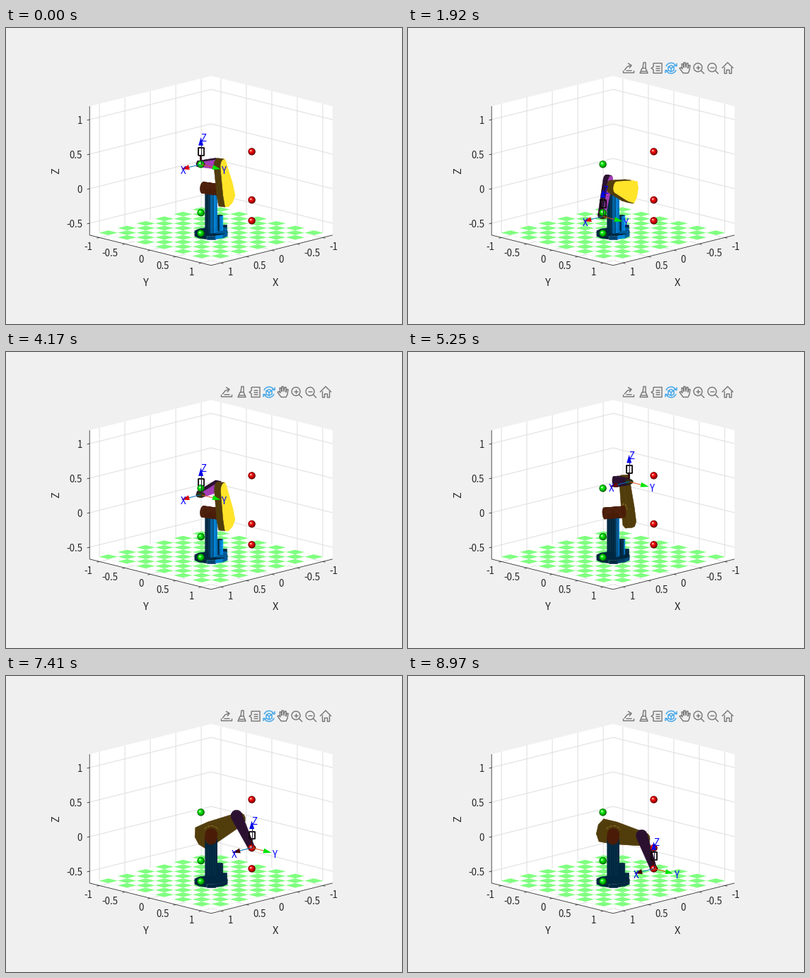
A matplotlib script that plays this animation: 560 by 420 pixels, repeating every 9 s.

```python
import numpy as np
import matplotlib.pyplot as plt
from matplotlib.animation import FuncAnimation
from matplotlib.collections import LineCollection, PolyCollection
from matplotlib.patches import Circle

plt.rcParams["font.family"] = ["Noto Sans CJK JP", "DejaVu Sans"]
PX = 0.72                      # points per pixel at 100 dpi
FRAMES, STEP = 300, 50
W, FLOOR, TOP = 1.193, -0.672, 1.194
VIEW = np.array([0.684, 0.684, 0.25])
UPPER, FORE, OFFSET = 0.4318, 0.4323, 0.15

BLUE, RUST = (0, .447, .741), (.85, .325, .098)
YELLOW, PURPLE = (.929, .694, .125), (.494, .184, .556)
INK, GRID = "#262626", "#dedede"

LEFT = [(.5, .3, z) for z in (.5, -.2, -.5)]
RIGHT = [(-.5, .3, z) for z in (.5, -.2, -.5)]
ROUTE = np.array(LEFT + LEFT[:1] + RIGHT)


def project(p):
    x, y, z = np.moveaxis(np.asarray(p, float), -1, 0)
    return np.stack([290 + 72 * (y - x), 228 + 18 * (x + y) - 98 * z], -1)


fig = plt.figure(figsize=(5.6, 4.2), dpi=100, facecolor="#f0f0f0")
ax = fig.add_axes([0, 0, 1, 1])
ax.set(xlim=(0, 560), ylim=(420, 0))
ax.axis("off")


def lines(segs, color, width, z, **kw):
    return ax.add_collection(
        LineCollection(segs, colors=color, linewidths=width * PX, zorder=z, **kw),
        autolim=False)


def polys(verts, color, z, **kw):
    return ax.add_collection(
        PolyCollection(verts, facecolors=color, zorder=z, **kw), autolim=False)


def label(x, y, s, size=13.3, color=INK, ha="center", **kw):
    return ax.text(x, y, s, fontsize=size * PX, color=color, ha=ha,
                   va="center_baseline" if kw.get("rotation") is None else "center", **kw)


# ---------- axes box, grid and floor ----------
def build_box():
    wall = [(W, -W, TOP), (-W, -W, TOP), (-W, W, TOP),
            (-W, W, FLOOR), (W, W, FLOOR), (W, -W, FLOOR)]
    polys([project(wall)], "white", 0)
    ticks = (-1, -.5, 0, .5, 1)
    grid = []
    for t in ticks:
        grid += [[(t, -W, TOP), (t, -W, FLOOR), (t, W, FLOOR)],
                 [(-W, t, TOP), (-W, t, FLOOR), (W, t, FLOOR)]]
        if t > -1:
            grid.append([(W, -W, t), (-W, -W, t), (-W, W, t)])
    lines([project(g) for g in grid], GRID, 1, 1)

    edge = [project([(W, -W, TOP), (W, -W, FLOOR), (W, W, FLOOR), (-W, W, FLOOR)])]
    for t in ticks:
        name = f"{t:g}"
        a, b = project((W, t, FLOOR)), project((t, W, FLOOR))
        edge += [[a, a + (-3.5, .9)], [b, b + (3.5, .9)]]
        label(a[0] - 9.5, a[1] + 12, name, ha="right")
        label(b[0] + 9.5, b[1] + 12, name, ha="left")
        if t > -1:
            c = project((W, -W, t))
            edge.append([c, c + (-3.5, .9)])
            label(108, c[1] + .5, name, ha="right")
    lines(edge, INK, .8, 3)
    label(381, 361, "X", 14.6)
    label(198, 361, "Y", 14.6)
    label(71, 203, "Z", 14.6, rotation=90)

    n, size = 12, 2.2 / 12
    lo = -W + size * np.arange(n + 1)

    def tile(x0, x1, y0, y1):
        return project([(x0, y0, FLOOR), (x1, y0, FLOOR), (x1, y1, FLOOR), (x0, y1, FLOOR)])

    polys([tile(lo[0], lo[-1], lo[0], lo[-1])], "white", 2)
    polys([tile(lo[i], lo[i + 1], lo[j], lo[j + 1])
           for i in range(n) for j in range(n) if (i + j) % 2], "#80ff80", 2)


def ball(p, shades):
    x, y = project(p)
    for r, d, c in zip((5.2, 4.4, 2.9, 1.2), (0, .4, .8, 1.3), shades):
        ax.add_patch(Circle((x - d, y - d), r, fc=c, ec="none", zorder=8))


# ---------- toolbar ----------
def ring(x, y, r, a=0, b=360):
    t = np.radians(np.linspace(a, b, 25))
    return np.c_[x + r * np.cos(t), y + r * np.sin(t)]


def build_toolbar():
    y = 57
    def at(cx, *pts):
        return [(cx + a, y + b) for a, b in pts]

    icons = [
        at(312, (-8, 3), (-8, 6), (7, 6), (7, 3)), at(312, (-6, 3), (-2, -2), (3, -4)),
        at(312, (-1, -7), (4, -4), (1, 0)), at(312, (-4, 3), (4, 3)),
        at(333, (-2, 0), (-5, 7), (6, 7), (3, 0), (-2, 0)),
        at(333, (-1, 0), (0, -8), (3, -8), (3, 0)), at(333, (-4, 4), (4, 4)),
        at(352, (-5, -7), (7, -7), (7, 7), (-5, 7), (-5, 2), (-8, 0), (-5, -2), (-5, -7)),
        at(352, (-2, -3), (4, -3)), at(352, (-2, 0), (4, 0)), at(352, (-2, 3), (4, 3)),
        at(392, (-3, 7), (-8, 0), (-6, -1), (-4, 1), (-5, -6), (-3, -6), (-2, -1),
           (-2, -8), (0, -8), (1, -1), (2, -7), (4, -7), (4, 0), (5, -4), (7, -4),
           (6, 3), (4, 7), (-3, 7)),
        at(452, (-8, 0), (0, -8), (8, 0)),
        at(452, (-5, -2), (-5, 7), (-2, 7), (-2, 2), (2, 2), (2, 7), (5, 7), (5, -2)),
    ]
    for cx in (411, 431):
        icons += [ring(cx - 1, y - 1, 6), at(cx, (3.5, 3.5), (8, 8)), at(cx, (-4, -1), (2, -1))]
    icons.append(at(410, (0, -4), (0, 2)))
    cube = [ring(372, y, 7.5, 20, 160), ring(372, y, 7.5, 200, 340),
            at(372, (-4, -2), (0, -4), (4, -2), (4, 3), (0, 5), (-4, 3), (-4, -2), (0, 0),
               (4, -2)),
            at(372, (0, 0), (0, 5)),
            at(372, (4, -4), (8, -3), (8, -7)), at(372, (-4, 4), (-8, 3), (-8, 7))]
    return [lines(icons, "#747474", 1.4, 4), lines(cube, "#46a8ea", 1.5, 4)]


# ---------- robot solids: coordinates are (reach, side, height) ----------
def arc(cx, cy, r, a, b, n):
    t = np.radians(np.linspace(a, b, n))
    return [(cx + r * np.cos(q), cy + r * np.sin(q)) for q in t]


def side_prism(outline, s0, s1):
    """Extrude an outline of the arm plane along the side axis."""
    o = np.array(outline)
    return [np.c_[o[:, 0], np.full(len(o), s), o[:, 1]] for s in (s0, s1)]


def up_prism(cx, cy, r, z0, z1, n):
    o = np.array(arc(cx, cy, r, 0, 360, n + 1)[:-1])
    return [np.c_[o, np.full(n, z)] for z in (z0, z1)]


def turn(outline, ang, cx=0, cy=0):
    c, s = np.cos(ang), np.sin(ang)
    return [(cx + a * c - b * s, cy + a * s + b * c) for a, b in outline]


UPPER_SHAPE = ([(-.17, .155), (-.225, .06), (-.225, -.06), (-.17, -.155), (.02, -.15)]
               + arc(UPPER, 0, .085, -85, 85, 8) + [(.02, .15)])
FORE_SHAPE = arc(-.08, 0, .075, 90, 270, 9) + [(FORE, -.04), (FORE + .03, 0), (FORE, .04)]
BASE = [(up_prism(0, 0, .235, FLOOR, -.625, 12), True),
        (up_prism(-.1, .1, .1, -.625, -.54, 4), False),
        (up_prism(-.085, .085, .045, -.6, -.39, 8), False),
        (up_prism(0, 0, .082, -.625, -.03, 18), True)]


def faces(rings, color, light, striped=False):
    """Visible faces of a convex solid, as (screen polygon, colour) pairs."""
    a, b = rings
    n = len(a)
    center = (a.mean(0) + b.mean(0)) / 2
    sides = [np.array([a[i], a[(i + 1) % n], b[(i + 1) % n], b[i]]) for i in range(n)]
    out = []
    for i, f in enumerate([a, b] + sides):
        norm = np.cross(f[1] - f[0], f[2] - f[1])
        norm /= np.linalg.norm(norm) + 1e-12
        if norm @ (f.mean(0) - center) < 0:
            norm = -norm
        if norm @ VIEW <= 1e-6:
            continue
        glow = .95 * max(0, norm @ light)
        if striped and i % 2:
            glow *= .5
        out.append((project(f), np.clip(np.array(color) * (.34 + glow), 0, 1)))
    return out


def ease(t):
    """Trapezoidal speed profile."""
    if t < 1 / 3:
        return 2.25 * t * t
    if t < 2 / 3:
        return 1.5 * t - .25
    return 1 - 2.25 * (1 - t) ** 2


def tip(k):
    leg, i = divmod(k, STEP)
    a, b = ROUTE[leg], ROUTE[leg + 1]
    return a + (b - a) * ease(i / (STEP - 1))


def solve(p):
    """Waist, shoulder and forearm angles that reach p."""
    x, y, z = p
    reach = -np.sqrt(x * x + y * y - OFFSET ** 2)
    waist = np.arctan2(y, x) - np.arctan2(-OFFSET, reach)
    d = np.hypot(reach, z)
    bend = np.arccos((d * d + UPPER ** 2 - FORE ** 2) / (2 * d * UPPER))
    shoulder = np.arctan2(z, reach) - bend
    ex, ez = UPPER * np.cos(shoulder), UPPER * np.sin(shoulder)
    return waist, shoulder, np.arctan2(z - ez, reach - ex), ex, ez


build_box()
for p in LEFT:
    ball(p, ("#005a00", "#00b400", "#10e610", "#c8ffc8"))
for p in RIGHT:
    ball(p, ("#5a0000", "#be0000", "#eb1414", "#ffc0c0"))
toolbar = build_toolbar()

robot = polys([], "k", 6, linewidths=.4)
boss = lines([], "#96702a", 1, 6.5, linestyles=(0, (4, 1.5)))
wrist = polys([], ["#2d3210", "#3c0808"], 7, edgecolors="none")
claw = lines([], "#0c0404", 1.8, 7)
AXIS_DIR = np.array([(-28.8, 7.2), (28.8, 7.2), (0, -39.2)])
shafts = lines([], ["#0072bd", "#d95319", "#26263c"], 1, 9)
heads = polys([], "k", 10, edgecolors="none")
names = [label(0, 0, s, 13.3, "#0000ff", "left", zorder=11) for s in "XYZ"]

BLOB = np.array(arc(0, 0, 1, 0, 360, 16)) * (6, 4)
STEM = np.array([(-1.5, -3), (-1.5, -13), (1.5, -13), (1.5, -3)])
CLAW = np.array([(-4, -12.5), (-4, -23), (4, -23), (4, -12.5), (-4, -12.5)])


def head(d):
    u = d / np.hypot(*d)
    side = np.array([-u[1], u[0]]) * 3.5
    base = d - 12.5 * u
    return np.array([d - u, base + side, base - side])


def draw(k):
    p = tip(k)
    waist, shoulder, fore, ex, ez = solve(p)
    c, s = np.cos(waist), np.sin(waist)
    side = np.array([s, -c, 0])
    frame = np.array([(c, s, 0), side, (0, 0, 1)])
    facing = side @ VIEW

    def limb(rings, color):
        return faces([r @ frame for r in rings], color, side)

    upper = limb(side_prism(turn(UPPER_SHAPE, shoulder), .17, .27), YELLOW)
    lower = limb(side_prism(turn(FORE_SHAPE, fore, ex, ez), .09, .165), PURPLE)
    hub = limb(side_prism(arc(0, 0, .08, 0, 345, 24), -.13, .16), RUST)
    body = [f for rings, st in BASE for f in faces(rings, BLUE, side, st)] + hub
    parts = body + lower + upper if facing > 0 else upper + lower + body
    colors = [f[1] for f in parts]
    robot.set_verts([f[0] for f in parts])
    robot.set_facecolor(colors)
    robot.set_edgecolor(colors)

    rim = np.array(arc(0, 0, .115, 35, 150, 16))
    rim = np.c_[rim[:, 0], np.full(16, .17), rim[:, 1]] @ frame
    boss.set_segments([project(rim)])
    boss.set_visible(facing < -.2)

    e = project(p)
    wrist.set_verts([BLOB + e, STEM + e])
    claw.set_segments([CLAW + e])
    shafts.set_segments([[e, e + d * .75] for d in AXIS_DIR])
    heads.set_verts([head(d) + e for d in AXIS_DIR])
    red = .28 + .6 * np.clip(.5 + facing, 0, 1)
    heads.set_facecolor([(red, .02, 0), (0, .9, 0), (.02, .02, .9)])
    for t, d in zip(names, AXIS_DIR):
        t.set_position(e + d + (0, 1.2))
    for icon in toolbar:
        icon.set_visible(k > 0)
    return []


anim = FuncAnimation(fig, draw, frames=FRAMES, interval=30, repeat=True,
                     repeat_delay=0, blit=False)
plt.show()
```
